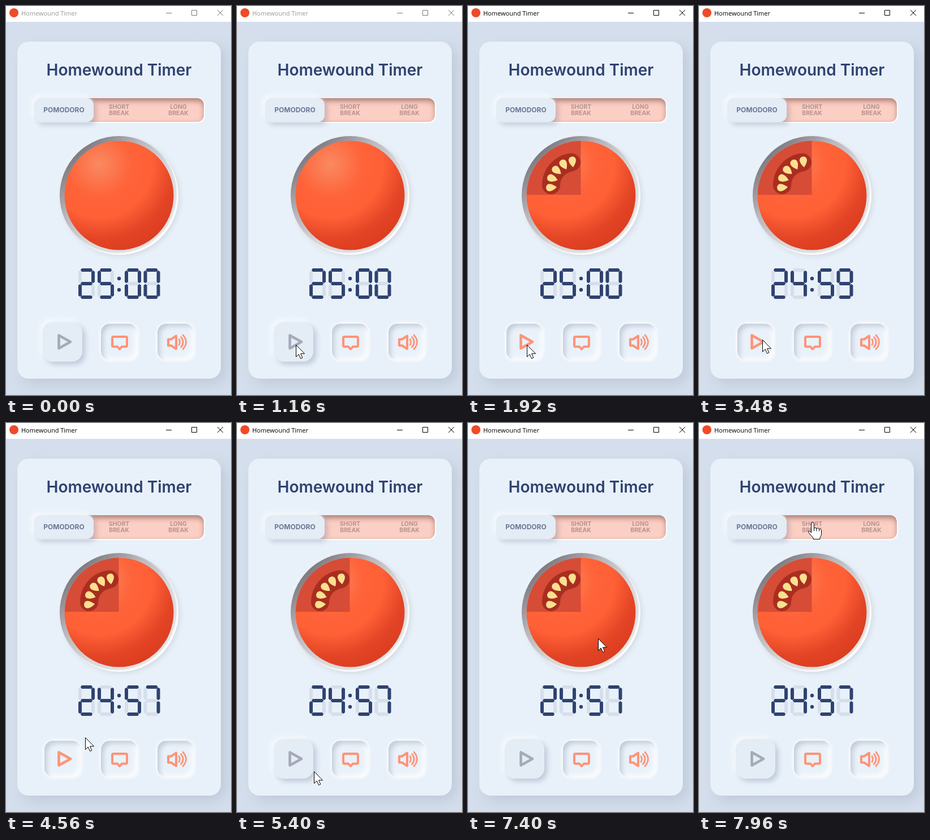
An HTML page that plays this animation: 398 px wide and 688 px high, repeating every 8000 ms.

```html
<!DOCTYPE html>
<html lang="en">
<head>
<meta charset="utf-8">
<title>Timer</title>
<style>
  html, body { margin: 0; width: 100%; height: 100%; overflow: hidden; background: #d4deec; }
  #stage { position: relative; width: 398px; height: 688px; overflow: hidden; }
  #stage div, svg { position: absolute; box-sizing: border-box; }
  svg { left: 0; top: 0; }
  .bar { width: 398px; height: 28px; background: #fff; }
  .card { left: 20px; top: 63px; width: 360px; height: 596px; border-radius: 20px; background: #e8f1f9;
    box-shadow: 8px 8px 24px #bdc8d8, -6px -6px 20px #d8e2ef; }
  .track { left: 50px; top: 163px; width: 300px; height: 42px; border-radius: 12px; background: #fbcfc4;
    box-shadow: inset 0 5px 10px #7a484470, inset 4px 4px 8px #7a484440, 1px 1px 1px 1px #fff; }
  .raised { background: #e4ecf6; box-shadow: 5px 5px 9px #32466e38, -5px -5px 9px #f5f9fd; }
  .pill { left: 50px; top: 163px; width: 105px; height: 42px; border-radius: 12px; }
  .ring { left: 95px; top: 230px; width: 210px; height: 210px; border-radius: 50%;
    background: linear-gradient(135deg, #7d7980 14%, #b9b7bc 36%, #d8d8db 58%, #e0e0e2 86%);
    box-shadow: inset -3px -3px 3px #fff, 3px 3px 8px #d3dae5, -2px -2px 6px #eef4fa; }
  .key, .key div { width: 70px; height: 70px; border-radius: 18px; }
  .key { top: 559px; }
  .inset { background: #e9f1f9;
    box-shadow: inset 0 0 0 3px #f4f7fb, inset 7px 7px 8px #c2cbd8, inset -7px -7px 8px #fafcfe, 0 0 2px 1px #f1f5fa; }
  text { font-family: Inter, sans-serif; text-anchor: middle; }
  .icon { fill: none; stroke-width: 4; stroke-linecap: round; stroke-linejoin: round; }
</style>
</head>
<body>
<div id="stage">
  <div class="bar"></div>
  <div class="card"></div>
  <div class="track"></div>
  <div class="raised pill"></div>
  <div class="ring"></div>
  <div class="key" style="left:65px"><div class="inset"></div><div class="raised"></div></div>
  <div class="key" style="left:165px"><div class="inset"></div><div class="raised"></div></div>
  <div class="key" style="left:265px"><div class="inset"></div><div class="raised"></div></div>

  <svg width="398" height="688">
    <defs>
      <radialGradient id="skin" gradientUnits="userSpaceOnUse" cx="165" cy="280" r="162">
        <stop offset="0" stop-color="#f98a61"/>
        <stop offset=".36" stop-color="#ff6339"/>
        <stop offset=".58" stop-color="#ff6036"/>
        <stop offset=".82" stop-color="#e24425"/>
        <stop offset="1" stop-color="#dc3d20"/>
      </radialGradient>
    </defs>

    <circle cx="14" cy="12" r="8" fill="#ef4a29"/>
    <g id="chrome">
      <text x="27" y="17" style="font:11px 'Open Sans',sans-serif;text-anchor:start">Homewound Timer</text>
      <path d="M283 12.5h10M328.5 7.5h9v9h-9zM374 7l10 10M384 7l-10 10" fill="none" stroke="currentColor"/>
    </g>

    <text x="200" y="123" font-size="28" font-weight="600" fill="#2f4270">Homewound Timer</text>
    <g font-weight="700" font-size="10.5" fill="#b8938d">
      <text x="102.5" y="188" font-size="12" fill="#6b7795">POMODORO</text>
      <text x="200" y="182">SHORT</text><text x="200" y="193">BREAK</text>
      <text x="305" y="182">LONG</text><text x="305" y="193">BREAK</text>
    </g>

    <circle cx="200" cy="335" r="96.5" fill="url(#skin)"/>
    <g id="slice">
      <path d="M199.500 334V238.500A96 96 0 0 0 104 334Z" fill="#d64c36"/>
      <path d="M147 317A41 41 0 0 1 183 276.500" fill="none" stroke="#a92e20" stroke-width="32" stroke-linecap="round"/>
      <g id="seeds" fill="#fbe08f"></g>
    </g>

    <g id="clock"></g>
    <g fill="#2f4270"><circle cx="200" cy="482" r="3.2"/><circle cx="200" cy="502" r="3.2"/></g>

    <path class="icon" d="M93.500 582.500v23l20.500-11.500z" style="stroke-width:4.600"/>
    <path class="icon" d="M190 585h22q2 0 2 2v13.500q0 2-2 2h-7l-4 4.500-4-4.500h-7q-2 0-2-2V587q0-2 2-2z"/>
    <g class="icon">
      <path d="M287 589.500h5l9-6v23l-9-6h-5z"/>
      <path d="M306 589.500q3 5 0 10M309.500 585.500q7.500 9 0 18M313 582q11 12.500 0 25" stroke-width="2.700"/>
    </g>

    <g id="cursor" fill="#fff" stroke="#000">
      <path id="arrow" d="M.5.5V21.500L5.200 17 8.600 24.500 11.800 23 8.600 15.800H15.500Z"/>
      <path id="hand" stroke-linejoin="round" d="M-2.500 18V2Q0-3 2.500 2V10Q5 8 7 10.500Q9.500 8.500 11.500 11.500Q15.500 10.500 15.500 15V20Q15.500 24 13 26.500V29.500H1V27Q-4 22-7.500 17Q-7.500 12-2.500 18ZM2.500 10v5M7 10.500v5M11.500 11.500v4"/>
    </g>
  </svg>
</div>

<script>
const LOOP = 8000;
const $ = id => document.getElementById(id);
const clamp = v => Math.min(1, Math.max(0, v));
const easeOut = u => 1 - (1 - u) ** 2;
const fade = (t, start) => { const u = clamp((t - start) / 400); return u * u * (3 - 2 * u); };

// Five seeds on an arc, each pointing at its centre
for (let i = 0; i < 5; i++) {
  const angle = -4 + i * 21.75;
  $('seeds').innerHTML += `<path transform="translate(190 318) rotate(${angle}) translate(-43)"
    d="M10 0Q2 7-4 6.500Q-9 5-9 0T-4-6.500Q2-7 10 0Z"/>`;
}

// Seven-segment digits: each segment is the same pointed bar at another place
const INK = '#2f4270', GHOST = '#d5deea';
const LEFT = 3, RIGHT = 26, ROW = 24;
const LIT = { 0: 'abcdef', 2: 'abged', 4: 'fgbc', 5: 'afgcd', 7: 'abc', 8: 'abcdefg', 9: 'abcdfg' };

function bar(name, x, y, length, turn) {
  const tip = length - .8, side = length - 3;
  return `<path data-name="${name}" transform="translate(${x} ${y}) rotate(${turn})"
    d="M.8 0L3-3H${side}L${tip} 0L${side} 3H3Z"/>`;
}
const across = [...'agd'].map((name, row) => bar(name, LEFT, 3 + row * ROW, RIGHT - LEFT, 0));
const down = [...'febc'].map((name, i) => bar(name, i < 2 ? LEFT : RIGHT, 3 + i % 2 * ROW, ROW, 90));
const digitMarkup = [...across, ...down].join('');
$('clock').innerHTML = [128, 162, 210, 243.5]
  .map(x => `<g transform="translate(${x} 464)">${digitMarkup}</g>`).join('');

function showTime(seconds) {
  const text = String(Math.floor(seconds / 60) * 100 + seconds % 60);
  [...$('clock').children].forEach((digit, i) => {
    for (const part of digit.children) part.setAttribute('fill', LIT[text[i]].includes(part.dataset.name) ? INK : GHOST);
  });
}

// Pointer moves: start, end, x, y
const moves = [
  [440, 1160, 104, 599], [3440, 3800, 140, 556], [4800, 5040, 118, 592],
  [5240, 5400, 136, 616], [5400, 5640, 148, 619], [5640, 5840, 205, 598],
  [6760, 6920, 197, 593], [7120, 7480, 232, 370], [7480, 7760, 197, 164], [7760, 7960, 201, 176]
];
function pointerAt(t) {
  let x = 218, y = 676;
  for (const [start, end, toX, toY] of moves) {
    const u = easeOut(clamp((t - start) / (end - start)));
    x += (toX - x) * u;
    y += (toY - y) * u;
  }
  return [Math.round(x), Math.round(y)];
}

const raisedKeys = document.querySelectorAll('.key .raised');
const insetKeys = document.querySelectorAll('.key .inset');
const icons = document.querySelectorAll('.icon');
function setKey(i, raised) {
  raisedKeys[i].style.opacity = raised;
  insetKeys[i].style.opacity = 1 - raised;
  icons[i].style.stroke = `color-mix(in srgb, #a5aab7 ${raised * 100}%, #ff9378)`;
}

function draw(t) {
  const active = t >= 1400;
  $('chrome').style.color = active ? '#000' : '#777';
  $('chrome').style.fill = active ? '#000' : '#999';

  const started = fade(t, 1520);
  $('slice').style.opacity = started;
  setKey(0, 1 - started + fade(t, 5000));
  setKey(1, t < 6440 ? fade(t, 6000) : 0);
  setKey(2, 0);

  // Counts down from 25:00 until paused at 5000 ms
  const elapsed = Math.max(0, Math.floor((Math.min(t, 5000) - 1620) / 980));
  showTime(25 * 60 - elapsed);

  const [x, y] = pointerAt(t);
  const overTab = y < 205;
  $('cursor').style.display = t < 440 ? 'none' : '';
  $('cursor').setAttribute('transform', `translate(${x} ${y})`);
  $('arrow').style.display = overTab ? 'none' : '';
  $('hand').style.display = overTab ? '' : 'none';
}

const begin = performance.now();
function tick() {
  draw((performance.now() - begin) % LOOP);
  requestAnimationFrame(tick);
}
tick();
</script>
</body>
</html>
```
